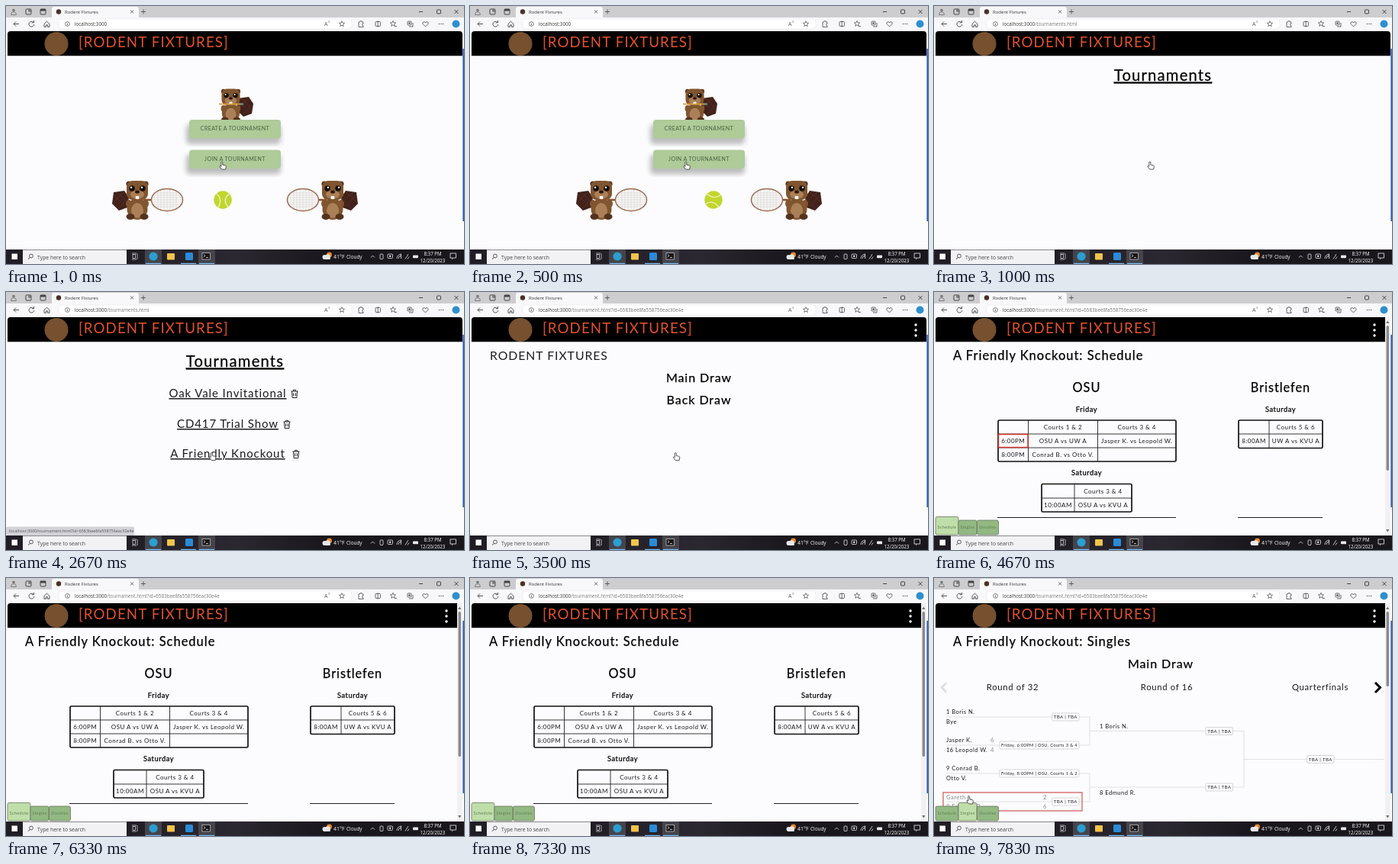
An HTML page for the animation above (8 s loop, 600 by 338 pixels).

```html
<!DOCTYPE html>
<html lang="en">
<head>
<meta charset="utf-8">
<title>Rodent Fixtures</title>
<style>
  html, body { margin: 0; width: 100%; height: 100%; overflow: hidden; background: #fcfbfd; }
  svg { display: block; width: 100vw; height: 100vh; }
  .page text { font-family: Lato, "Open Sans", sans-serif; letter-spacing: .06em; fill: #1c1c1e; }
  .page text[fill] { fill: attr(fill); }
  .page .head { fill: #000; stroke: #000; stroke-width: .25px; }
  .page .brand { fill: #e2512b; }
  .page .dim { fill: #888; }
  .page .act { fill: #48613f; }
  .page .tab { fill: #5f7d53; }
  .ui { font-family: "Open Sans", "Noto Sans", sans-serif; }
  .link { text-decoration: underline; text-decoration-thickness: 1px; text-underline-offset: 2px; }
</style>
</head>
<body>
<svg id="stage" viewBox="0 0 600 338" xmlns="http://www.w3.org/2000/svg"></svg>
<script>
const LOOP = 8000, STEP = 1000 / 6;
const BRAND = "Rodent Fixtures", EVENT = "A Friendly Knockout";
const HOST = "localhost:3000";
const DETAIL = "/tournament.html?id=6583bee8fa558756eac30e4e";
const HEAD = 'class="head"', DIM = 'class="dim"';

const esc = s => String(s).replace(/&/g, "&amp;");
const text = (x, y, size, s, o = "") => `<text x="${x}" y="${y}" font-size="${size}" ${o}>${esc(s)}</text>`;
const mid = (x, y, size, s, o = "") => text(x, y, size, s, `text-anchor="middle" ${o}`);
const rect = (x, y, w, h, fill, o = "") => `<rect x="${x}" y="${y}" width="${w}" height="${h}" fill="${fill}" ${o}/>`;
const circle = (x, y, r, fill, o = "") => `<circle cx="${x}" cy="${y}" r="${r}" fill="${fill}" ${o}/>`;
const oval = (x, y, rx, ry, fill, o = "") => `<ellipse cx="${x}" cy="${y}" rx="${rx}" ry="${ry}" fill="${fill}" ${o}/>`;
const line = (d, color = "#222", w = 1, o = "") => `<path d="${d}" fill="none" stroke="${color}" stroke-width="${w}" ${o}/>`;
const group = (id, body, o = "") => `<g id="${id}" ${o}>${body}</g>`;
const at = (x, y, body, extra = "") => `<g transform="translate(${x} ${y}) ${extra}">${body}</g>`;

// Browser window and taskbar
function browser() {
  const ink = "#444";
  return rect(0, 0, 600, 15, "#cdcdcf")
    + rect(60, 1, 114, 16, "#f8f7f9", 'rx="3"')
    + rect(0, 15, 600, 19, "#f8f7f9")
    + circle(10, 5.5, 1.8, "#777") + line("M6.5 11.5q0-4 3.5-4t3.5 4z", "#777", .9)
    + rect(26, 4, 7, 7, "none", `rx="1" stroke="${ink}"`) + circle(31, 6, 2, "#777")
    + rect(45, 4, 7, 7, "none", `rx="1" stroke="${ink}"`) + rect(45, 4, 7, 2.5, ink)
    + circle(69, 7.5, 3.2, "#4a3024")
    + text(77, 10, 6, BRAND, 'fill="#333"')
    + line("M163 5.5l4 4m0-4l-4 4M177 7.5h6m-3-3v6", ink, .8)
    + line("M541 7.5h5M587.5 5l5 5m0-5l-5 5", "#222", .8)
    + rect(564.5, 5, 5, 5, "none", 'stroke="#222" stroke-width=".8" rx="1"')
    + line("M17 23.5h-7m3-3l-3 3 3 3M36 21.5a3.4 3.4 0 1 0 .8 2.5M36.5 19v2.8h-2.8", ink, .9)
    + line("M50 23.5l3.5-3.3 3.5 3.3v3.8h-2.5v-2.5h-2v2.5h-2.5z", ink, .9)
    + rect(69, 17, 384, 13, "#fff", 'rx="4" stroke="#e7e6e9" stroke-width=".6"')
    + circle(80.5, 23.5, 2.9, "none", `stroke="${ink}" stroke-width=".7"`)
    + line("M80.5 23v2.2M80.5 21.7v.6", ink, .8)
    + text(417, 26, 7, "A", 'fill="#555"') + line("M422.5 19l1.4 1.5-1.4 1.5", ink, .6)
    + line(star(440, 23.5), ink, .7)
    + line("M462 21h1.6a1.4 1.4 0 0 1 2.8 0h1.6v2.2a1.4 1.4 0 0 0 0 2.8v1.5h-6z", ink, .8)
    + rect(484, 20.5, 6.5, 6, "none", `rx="1" stroke="${ink}" stroke-width=".8"`) + line("M487.2 19.5v8", ink, .8)
    + line(star(507, 23.2), ink, .7) + line("M509 26.5h3", ink, .8)
    + rect(526, 20, 5, 5, "none", `rx="1" stroke="${ink}" stroke-width=".8"`) + line("M528 27h5v-5M528.5 21v3m-1.5-1.5h3", ink, .8)
    + line("M549.5 27l-3.4-3.4q-.8-2.8 1.6-3 1.4.2 1.8 1.4.4-1.2 1.8-1.4 2.4.2 1.6 3z", ink, .8)
    + [567.5, 570, 572.5].map(x => circle(x, 23.5, .7, ink)).join("")
    + circle(589.5, 23.5, 5, "#2f8fd0")
    + `<text id="url" x="90" y="26" font-size="6.25" fill="#333">${HOST}<tspan id="path" fill="#777"></tspan></text>`;
}

function star(cx, cy) {
  const pts = Array.from({ length: 10 }, (_, i) => {
    const a = i * Math.PI / 5 - Math.PI / 2, r = i % 2 ? 1.7 : 3.8;
    return (cx + r * Math.cos(a)).toFixed(2) + " " + (cy + r * Math.sin(a)).toFixed(2);
  });
  return "M" + pts.join("L") + "z";
}

function taskbar() {
  const w = "#e8e8ea";
  return rect(0, 319, 600, 19, "url(#dusk)")
    + rect(7.5, 324.5, 7.5, 7.5, "#fff")
    + rect(22, 319.5, 136, 18.5, "#f2f1f3")
    + circle(33, 327.5, 2.4, "none", 'stroke="#333" stroke-width=".8"') + line("M31.3 329.4l-2.3 2.4", "#333", .9)
    + text(41, 331.5, 6.9, "Type here to search", 'fill="#444"')
    + rect(166, 325.5, 3.5, 5, "none", `stroke="${w}" stroke-width=".7"`) + line("M165 324h6M165 332h6M172 324v8", w, .7)
    + rect(182, 319, 22, 19, "#45444b") + rect(252, 319, 22, 19, "#45444b")
    + circle(193, 328, 5.6, "#2b9fd0")
    + rect(211, 324, 10, 8.5, "#f2c34c", 'rx="1"')
    + rect(235, 323, 10, 10, "#2a8ad8", 'rx="1.5"')
    + rect(257, 323.5, 10.5, 8.5, "#16161a", `stroke="${w}" stroke-width=".6"`) + line("M259 325.5l2 1.7-2 1.7M262 329.5h3", w, .8)
    + [[183, 20], [229, 20], [253, 20]].map(([x, n]) => rect(x, 336.8, n, 1.2, "#76b9ed")).join("")
    + circle(423.5, 326, 3.4, "#ef8a2c") + circle(417.5, 329, 3, w) + circle(421.5, 328.5, 3.2, w) + rect(416, 329, 9, 3, w, 'rx="1.5"')
    + text(429, 331.3, 7, "41°F", 'fill="#fff"') + text(446, 331.3, 6.4, "Cloudy", 'fill="#fff"')
    + line("M478 329.5l2.5-2.5 2.5 2.5", w, .8)
    + rect(490, 325, 4, 6.5, "none", `rx="1" stroke="${w}" stroke-width=".8"`)
    + rect(500, 325, 6.5, 5.5, "none", `rx="1" stroke="${w}" stroke-width=".8"`) + circle(503.2, 327.7, 1.2, w)
    + line("M512 331a6 6 0 0 1 6-6M514 331a4 4 0 0 1 4-4M517.5 325v6", w, .8)
    + line("M523 331.5l4-6.5M526 331.5l2-3", w, .8)
    + rect(533, 326.5, 7, 3.8, w, 'rx=".8"')
    + mid(559, 326.5, 6.2, "8:37 PM", 'fill="#fff"') + mid(559, 335.8, 6.2, "12/20/2023", 'fill="#fff"')
    + rect(582, 324, 7.5, 6, "none", `stroke="${w}" stroke-width=".8"`) + line("M584 332l1.5-1.8", w, .8);
}

function header() {
  return `<path id="bar" fill="#000"/>`
    + circle(66, 49.5, 15.5, "#76502f")
    + text(95, 54, 18.7, `[${BRAND.toUpperCase()}]`, 'class="brand"')
    + group("menu", [43, 50, 57].map(y => circle(0, y, 1.7, "#fff")).join(""))
    + group("scroll", rect(591, 33, 7, 286, "#f1f0f2") + rect(592.5, 44, 3.5, 190, "#8b8b8d", 'id="thumb" rx="1.7"')
      + `<path d="M592 41l2.3-3.5 2.3 3.5zM592 311l2.3 3.5 2.3-3.5z" fill="#777"/>`)
    + rect(598.4, 56, 1.6, 226, "#2c58b8");
}

// Landing page
function beaver() {
  const fur = "#80552f", pale = "#ab8058", dark = "#54331d";
  const pair = f => f(-1) + f(1);
  return pair(s => circle(s * 11, -21, 3.6, dark))
    + oval(0, 12, 13.5, 14, fur) + oval(0, 14, 8, 10, pale)
    + rect(-14, -25, 28, 25, fur, 'rx="8"')
    + pair(s => circle(s * 7, -15, 3.7, "#140c08") + circle(s * 7 - 1, -16.2, 1.2, "#fff"))
    + oval(0, -7, 9, 5.5, pale) + oval(0, -10.5, 3, 2, "#2b1710")
    + rect(-2.2, -5, 4.4, 4, "#fff")
    + pair(s => oval(s * 9, 22, 5.5, 4, dark) + oval(s * 11, 5, 4, 5, fur));
}

const tail = (x, y) => at(x, y, `<path d="M-9-11L5-13 11-4 9 9-2 13-11 4z" fill="#42221a"/>`
  + line("M-8-6L7 8M-4-11L9 3M-9 2L5-12M-3 11L10-3", "#5e372a", .6));

function player() {
  const net = [-12, -8, -4, 0, 4, 8, 12].map(x => `M${x}-13V13`).join("") + [-9, -6, -3, 0, 3, 6, 9].map(y => `M-18 ${y}H18`).join("");
  return tail(-22, 1)
    + line("M8 0h12", "#8a5430", 2.6)
    + at(39, 0, oval(0, 0, 20.5, 14.5, "#f8f6f6") + line(net, "#cfcbcb", .5) + oval(0, 0, 20.5, 14.5, "none", 'stroke="#9b6a4c" stroke-width="1.5"'))
    + beaver();
}

const button = (y, s) => rect(236, y + 6, 124, 26, "#8a8a8a", 'rx="5" opacity=".55" filter="url(#soft)"')
  + rect(240, y, 120, 24.5, "#aecb98", 'rx="4"')
  + mid(300, y + 14, 7, s, 'class="act"');

function landing() {
  const ball = circle(0, 0, 11.7, "#c2d62e")
    + line("M-8-8Q0-1-6 10M8-8Q-1 1 7 9", "#eef3c4", 1.3);
  return tail(313, 132)
    + at(294.5, 130, beaver(), "scale(.86)")
    + line("M279 128.5h32", "#d9a53f", 1.8) + line("M307 128.5h4", "#5a8f86", 2)
    + button(149, "CREATE A TOURNAMENT") + button(188.5, "JOIN A TOURNAMENT")
    + at(172, 254, player()) + at(428, 254, player(), "scale(-1 1)")
    + group("ball", ball);
}

// Tournament list
const bin = (x, y) => at(x, y, line("M-4.5-3.5h9M-1.5-3.5v-1.7h3v1.7M-3.5-3.5l.6 8.5h5.8l.6-8.5M-1.3-1.2v4M1.3-1.2v4", "#222", 1));
const entry = (y, s, x) => mid(290.5, y, 15, s, 'class="link"') + bin(x, y - 4.5);

const list = () => entry(138, "Oak Vale Invitational", 378) + entry(178, "CD417 Trial Show", 368) + entry(217, EVENT, 380);
const hint = () => rect(0, 307.5, 168, 11.5, "#d3d2d8", 'rx="2"') + text(4, 315, 5.4, HOST + DETAIL, 'fill="#555"');

// Schedule: xs and ys are grid lines, rows hold the cell texts
function table(xs, ys, rows) {
  const [x0, x1] = [xs[0], xs.at(-1)], [y0, y1] = [ys[0], ys.at(-1)];
  const inner = xs.slice(1, -1).map(x => `M${x} ${y0}V${y1}`).join("") + ys.slice(1, -1).map(y => `M${x0} ${y}H${x1}`).join("");
  return line(inner, "#222", .9)
    + rect(x0, y0, x1 - x0, y1 - y0, "none", 'rx="1.5" stroke="#111" stroke-width="1.7"')
    + rows.map((row, r) => row.map((s, c) => mid((xs[c] + xs[c + 1]) / 2, ys[r] + 12.2, 8, s)).join("")).join("");
}

function schedule() {
  return text(25, 89, 16.5, EVENT + ": Schedule", HEAD)
    + mid(200, 131, 16.3, "OSU", HEAD) + mid(454, 131, 16.3, "Bristlefen", HEAD)
    + mid(200, 156.5, 9.3, "Friday", HEAD) + mid(200, 240, 9.3, "Saturday", HEAD) + mid(454, 156.5, 9.3, "Saturday", HEAD)
    + table([84, 123.5, 214.5, 317], [168, 186, 204, 222], [
      ["", "Courts 1 & 2", "Courts 3 & 4"],
      ["6:00PM", "OSU A vs UW A", "Jasper K. vs Leopold W."],
      ["8:00PM", "Conrad B. vs Otto V."]])
    + table([141, 184, 259], [251.5, 270, 288], [["", "Courts 3 & 4"], ["10:00AM", "OSU A vs KVU A"]])
    + table([399, 439, 509], [168, 186, 204.5], [["", "Courts 5 & 6"], ["8:00AM", "UW A vs KVU A"]])
    + line("M83 295.5H317M398 295.5H509", "#222", 1.2)
    + group("hot", rect(84.5, 186.5, 38.5, 17, "none", 'stroke="#d8332b" stroke-width="1.4"'));
}

// Singles bracket
function tag(right, y, s) {
  const w = s.length > 12 ? 104 : 35.5;
  return rect(right - w, y - 5, w, 10, "#fdfcfe", 'rx="1.5" stroke="#c6c5c8" stroke-width=".7"')
    + mid(right - w / 2, y + 2.2, s.length > 12 ? 5.7 : 6.1, s);
}

function singles() {
  const name = (x, y, s, o) => text(x, y, 7.6, s, o), TBA = "TBA | TBA";
  return text(25, 89, 16.5, EVENT + ": Singles", HEAD) + mid(297, 118, 16, "Main Draw", HEAD)
    + mid(103, 147, 11.3, "Round of 32") + mid(305, 147, 11.3, "Round of 16") + mid(506, 147, 11.3, "Quarterfinals")
    + line("M16 137.5l-6 6 6 6", "#ddd", 2.6) + line("M578 137l6.5 6.5-6.5 6.5", "#000", 3)
    + line("M16 182H204V219H16M16 256H204V293H16M204 200.5H406V274H204M406 237.5H590", "#dad8dc", .8)
    + name(16, 178, "1  Boris N.") + name(16, 190.5, "Bye")
    + name(16, 215, "Jasper K.") + name(16, 227.5, "16  Leopold W.") + name(74, 215, 6, DIM) + name(74, 227.5, 4, DIM)
    + name(16, 252, "9  Conrad B.") + name(16, 264.5, "Otto V.")
    + name(16, 289.5, "Gareth L.", DIM) + name(16, 302, "8  Edmund R.", DIM) + name(143, 289.5, 2, DIM) + name(143, 302, 6, DIM)
    + name(217, 197, "1  Boris N.") + name(217, 283.5, "8  Edmund R.")
    + tag(190, 182, TBA) + tag(190, 219, "Friday, 6:00PM | OSU, Courts 3 & 4")
    + tag(190, 256, "Friday, 8:00PM | OSU, Courts 1 & 2") + tag(190, 293, TBA)
    + tag(391.5, 200.5, TBA) + tag(391.5, 274, TBA) + tag(524, 237.5, TBA)
    + group("match", rect(12, 281, 182, 24, "none", 'stroke="#cf5650" stroke-width="1.2"'));
}

const tabs = on => [[2, 30, "Schedule"], [32, 24, "Singles"], [56.5, 28, "Doubles"]].map(([x, w, s], i) => {
  const y = i === on ? 294.5 : 299;
  return rect(x, y, w, 318 - y, i === on ? "#c0deaa" : "#93b983", 'rx="2" stroke="#66755f" stroke-width=".8"')
    + mid(x + w / 2, 310, 5.6, s, 'class="tab"');
}).join("");

const hand = `<path d="M-2.2-4.5q1-1 2 0V-1l3.6.8q1 .3 .9 1.4L3.7 5H-1.3L-4.2 1.4q0-1.2 1.2-.9l.8.7z" fill="#fff" stroke="#333" stroke-width=".8" stroke-linejoin="round"/>`;

const stage = document.getElementById("stage");
stage.innerHTML = `<defs><filter id="soft"><feGaussianBlur stdDeviation="3"/></filter>
  <linearGradient id="dusk"><stop offset=".25" stop-color="#201d25"/><stop offset=".5" stop-color="#2b2831"/><stop offset=".7" stop-color="#19171c"/></linearGradient></defs>`
  + rect(0, 0, 600, 338, "#fcfbfd")
  + group("chrome", browser(), 'class="ui"')
  + `<g class="page">` + header()
  + group("landing", landing())
  + group("title", mid(300, 97.5, 20.2, "Tournaments", 'class="head link"'))
  + group("list", list())
  + group("loading", text(26, 89, 15.8, BRAND.toUpperCase()) + mid(300, 117.5, 16, "Main Draw", HEAD) + mid(300, 146.5, 16, "Back Draw", HEAD))
  + group("schedule", schedule() + tabs(0))
  + group("singles", singles() + tabs(1)) + `</g>`
  + group("hint", hint(), 'class="ui"')
  + group("taskbar", taskbar(), 'class="ui"')
  + group("cursor", hand);

const $ = id => document.getElementById(id);
const show = (id, on) => $(id).setAttribute("display", on ? "inline" : "none");
const move = (id, x, y, extra = "") => $(id).setAttribute("transform", `translate(${x} ${y}) ${extra}`);
const ease = (t, a, b) => {
  const p = Math.min(1, Math.max(0, (t - a) / (b - a)));
  return p * p * (3 - 2 * p);
};

// Start and end of each part, in ms
const PARTS = {
  landing: [0, 660], title: [660, 3330], list: [1160, 3330], hint: [1490, 3330],
  loading: [3330, 3660], schedule: [3660, 7330], hot: [4330, 5160],
  singles: [7330, LOOP], match: [7660, LOOP], menu: [3330, LOOP], scroll: [3660, LOOP]
};

function draw(time) {
  const t = Math.floor((time % LOOP + 1) / STEP) * STEP;
  for (const id in PARTS) show(id, t >= PARTS[id][0] && t < PARTS[id][1]);

  const wide = t < 3660;
  $("bar").setAttribute("d", `M2 65.3V37q0-4 4-4H${wide ? "594q4 0 4 4" : "591"}V65.3z`);
  $("thumb").setAttribute("height", t < 7330 ? 190 : 98);
  move("menu", wide ? 584 : 577, 0);
  $("path").textContent = t < 660 ? "" : t < 3330 ? "/tournaments.html" : DETAIL;

  move("ball", 284 + t * .07, 254, `rotate(${t * .2})`);

  show("cursor", t < 3660 || t >= 7490);
  const slide = ease(t, 1330, 2330), rise = ease(t, 7330, 7830);
  if (t < 3660) move("cursor", 284 - 13.5 * slide, 209 + 6.5 * slide);
  else move("cursor", 44 + 4 * rise, 303 - 16 * rise);
}

function tick(now) {
  draw(now);
  requestAnimationFrame(tick);
}
draw(0);
requestAnimationFrame(tick);
</script>
</body>
</html>
```
